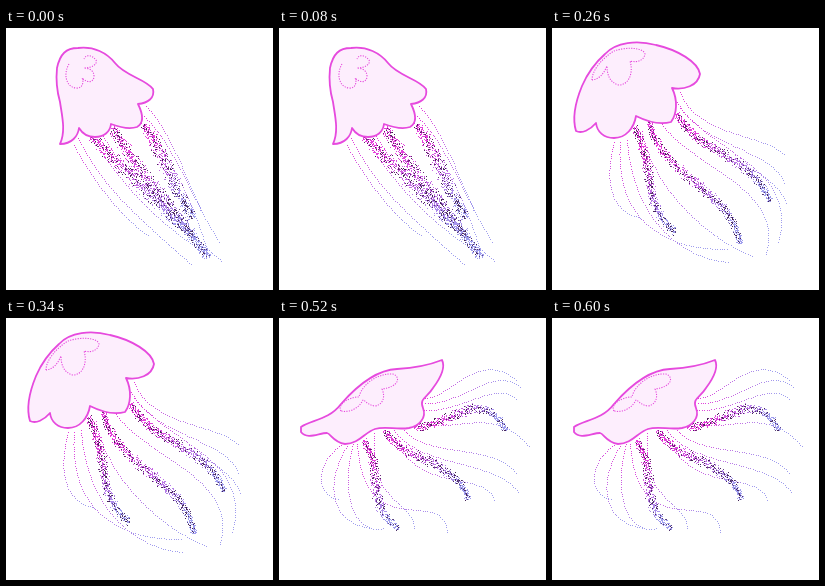
These frames come from a looping animation (267 px wide and 262 px high, 650 ms). An HTML page with a canvas:

```html
<!DOCTYPE html>
<html lang="en">
<head>
<meta charset="utf-8">
<title>Jellyfish</title>
<style>
html, body { margin: 0; width: 100%; height: 100%; overflow: hidden; background: #fff; }
canvas { display: block; width: 267px; height: 262px; }
</style>
</head>
<body>
<canvas id="stage" width="267" height="262"></canvas>
<script>
const ctx = document.getElementById('stage').getContext('2d');
const HOLD = 130;
const PINK = [228, 62, 218], BLUE = [160, 158, 238], DARK = [62, 28, 78];

// Threads and arms are cubic curves: start, two handles, end.
const poses = [
  {
    bell: 'M51 40C54 26 60 20 72 20C88 18 101 25 109 35C119 48 140 51 147 61C149 70 142 75 132 76C137 86 138 95 131 99C122 102 113 99 105 96C104 104 98 109 89 109C80 109 76 105 73 100C72 108 66 116 54 116C60 103 56 88 54 74C50 60 50 50 51 40Z',
    mark: 'M63 36C57 46 60 59 70 60C77 61 78 53 76 50C82 56 88 54 88 48C88 42 82 40 78 40C86 40 92 36 90 32C86 27 80 26 78 31',
    threads: ['68 117 85 150 115 190 143 208', '72 110 95 155 120 180 185 236',
      '85 108 110 150 150 195 200 225', '97 108 120 150 165 190 217 234',
      '108 98 130 150 170 190 205 228', '135 95 165 130 190 180 203 230',
      '138 88 170 120 185 170 213 214', '140 78 165 105 180 150 196 185'],
    arms: ['85 108 108 132 150 172 189 211', '106 99 125 135 165 175 201 229', '137 97 155 120 165 155 187 190'],
    width: 7
  },
  {
    bell: 'M59 20C70 13 90 15 105 24C125 34 145 48 149 57C148 64 136 65 123 63C131 70 135 78 133 86C122 93 104 91 91 86C91 100 84 109 71 111C60 109 54 103 52 96C46 103 42 109 34 108C28 104 30 88 32 72C37 50 48 32 59 20Z',
    mark: 'M60 37C54 43 48 51 46 60C51 58 56 53 59 49C62 58 68 60 73 60C82 58 84 48 82 38C88 40 97 36 97 31C95 24 88 24 82 25',
    threads: ['50 104 58 135 80 170 106 188', '56 106 75 155 110 225 158 229',
      '66 112 100 190 165 230 224 249', '74 111 95 165 135 205 178 215',
      '84 106 105 160 150 200 200 224', '112 92 150 150 215 170 204 232',
      '125 90 155 140 215 145 213 207', '134 66 160 110 230 130 222 207',
      '136 78 160 115 205 135 212 185'],
    arms: ['84 97 102 130 108 190 150 208', '98 92 118 135 160 155 190 207', '125 90 160 125 195 140 201 192'],
    width: 5
  },
  {
    bell: 'M53 26C64 14 85 12 104 17C126 22 146 34 148 46C146 58 132 62 120 60C126 72 125 86 119 94C108 97 94 93 84 88C82 100 74 110 62 110C52 110 45 104 44 95C38 102 30 106 24 103C20 90 23 75 30 58C36 44 44 34 53 26Z',
    mark: 'M40 52C40 43 49 31 62 23C73 19 91 19 93 26C92 32 86 35 78 33C82 46 76 57 67 57C58 55 55 47 55 38C52 45 48 51 40 52',
    threads: ['62 114 50 160 62 185 90 190', '68 114 62 190 110 222 175 221',
      '75 112 80 190 130 232 178 234', '90 103 100 160 155 210 200 228',
      '128 64 145 110 215 105 233 128', '125 74 150 120 220 120 232 155',
      '128 80 170 130 245 140 226 215', '110 96 140 140 235 160 213 228',
      '123 90 155 130 218 135 234 175'],
    arms: ['82 99 104 140 90 180 123 204', '97 93 108 150 180 160 188 216', '125 85 140 122 205 130 217 173'],
    width: 5
  },
  {
    bell: 'M45 28C55 14 75 11 94 14C120 17 147 27 150 41C149 53 134 58 118 56C121 70 118 84 112 90C100 92 86 91 75 88C72 98 62 104 50 103C42 101 37 95 36 87C32 92 28 99 22 98C17 90 19 75 25 60C31 46 38 36 45 28Z',
    mark: 'M40 50C38 42 46 36 53 38C54 30 64 18 78 17C92 17 94 26 91 30C86 33 80 32 76 30C80 42 76 48 68 48C60 49 54 44 53 38C52 46 48 51 40 50',
    threads: ['55 104 25 165 30 190 75 186', '64 102 55 180 75 215 178 212',
      '70 100 60 195 110 180 178 214', '83 93 95 160 150 180 192 208',
      '130 58 145 85 180 70 202 67', '134 62 150 95 215 55 227 105',
      '120 72 150 125 245 95 237 196', '122 76 180 130 245 50 257 110',
      '110 92 150 140 220 150 217 220', '105 94 140 150 205 140 207 200'],
    arms: ['76 95 110 130 80 185 127 207', '98 93 110 130 170 165 192 218', '118 78 150 115 215 120 221 170'],
    width: 5
  },
  {
    bell: 'M22 109C32 102 50 102 62 86C76 70 95 52 118 51C135 50 148 48 163 42C167 50 160 62 154 70C148 80 140 80 144 90C148 100 140 108 130 110C118 112 106 108 96 111C86 114 80 126 66 126C54 124 52 116 48 115C40 115 28 122 22 114Z',
    mark: 'M62 93C58 87 69 79 80 79C83 66 99 55 114 56C122 59 120 69 103 71C107 80 103 87 96 88C88 87 86 82 84 82C80 90 71 95 62 93',
    threads: ['62 127 35 145 36 178 60 181', '68 128 45 165 50 205 92 210',
      '74 126 60 175 75 218 105 210', '78 125 85 230 165 165 168 215',
      '95 115 90 190 135 180 135 212', '146 80 170 80 200 30 237 62',
      '146 85 180 88 215 45 243 70', '145 92 180 95 220 60 238 82',
      '140 105 180 115 215 85 251 130', '125 112 150 140 215 125 237 155',
      '115 112 140 150 215 140 240 175', '110 113 140 180 205 150 215 182'],
    arms: ['84 122 105 150 85 190 120 210', '105 112 120 140 175 140 189 181', '135 109 170 108 205 65 226 113'],
    width: 5
  }
];

function seeded(seed) {
  return () => (seed = (seed * 16807) % 2147483647) / 2147483647;
}

const mix = (a, b, t) => a.map((v, i) => Math.round(v + (b[i] - v) * t));

function dot(x, y, rgb) {
  ctx.fillStyle = `rgb(${rgb})`;
  ctx.fillRect(Math.round(x), Math.round(y), 1, 1);
}

function curve(text) {
  const p = text.split(' ').map(Number);
  return t => {
    const u = 1 - t;
    const axis = i => u * u * u * p[i] + 3 * u * u * t * p[i + 2] + 3 * u * t * t * p[i + 4] + t * t * t * p[i + 6];
    return [axis(0), axis(1)];
  };
}

// Calls put(x, y, t, angle) at even distances along a curve.
function walk(text, gap, put) {
  const at = curve(text), steps = 600;
  let [px, py] = at(0), run = gap;
  for (let i = 1; i <= steps; i++) {
    const t = i / steps, [x, y] = at(t);
    run += Math.hypot(x - px, y - py);
    if (run >= gap) {
      run -= gap;
      put(x, y, t, Math.atan2(y - py, x - px));
    }
    px = x;
    py = y;
  }
}

function thread(text) {
  walk(text, 2.4, (x, y, t) => dot(x, y, mix(PINK, BLUE, Math.min(1, t * 1.25))));
}

function arm(text, width, rand) {
  walk(text, 1, (x, y, t, angle) => {
    const reach = width * (0.75 + 0.4 * Math.sin(Math.PI * t));
    for (let i = 0; i < 5; i++) {
      const off = (rand() + rand() - 1) * reach;
      const tone = mix(PINK, BLUE, Math.min(1, Math.max(0, t * 1.5 - 0.3)));
      const rgb = rand() < 0.3 ? mix(DARK, tone, rand() * 0.4) : tone;
      dot(x - Math.sin(angle) * off, y + Math.cos(angle) * off, rgb);
    }
  });
}

function draw(index) {
  const pose = poses[index], rand = seeded(101 + index * 37);
  ctx.fillStyle = '#fff';
  ctx.fillRect(0, 0, 267, 262);
  pose.threads.forEach(thread);
  pose.arms.forEach(a => arm(a, pose.width, rand));

  const bell = new Path2D(pose.bell);
  ctx.fillStyle = '#fdeefd';
  ctx.fill(bell);
  ctx.strokeStyle = '#e64ade';
  ctx.lineWidth = 1.8;
  ctx.lineJoin = 'round';
  ctx.stroke(bell);

  ctx.setLineDash([1.2, 1.3]);
  ctx.lineWidth = 1.1;
  ctx.stroke(new Path2D(pose.mark));
  ctx.setLineDash([]);
}

let shown = -1;
const start = performance.now();

function tick(now) {
  const index = Math.floor(Math.max(0, now - start) / HOLD) % poses.length;
  if (index !== shown) draw(shown = index);
  requestAnimationFrame(tick);
}
tick(start);
</script>
</body>
</html>
```
